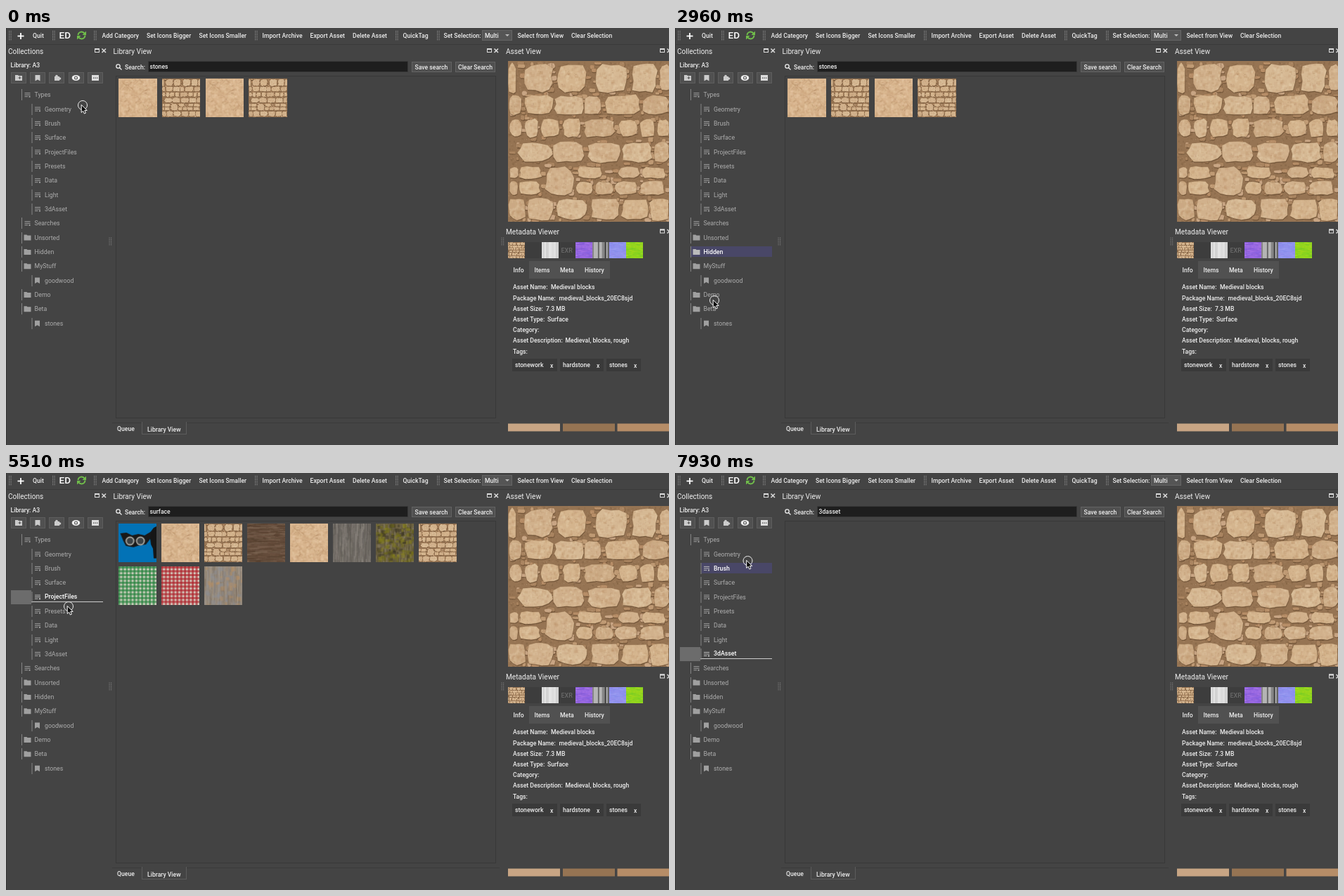
Write an HTML page with a canvas that moves like this. It is 943 px wide and 594 px high and loops after 8000 ms.

```html
<!DOCTYPE html>
<html lang="en">
<head>
<meta charset="utf-8">
<title>Asset library</title>
<style>
  html, body { margin: 0; width: 100%; height: 100%; overflow: hidden; background: #444; }
  canvas { display: block; }
</style>
</head>
<body>
<canvas id="stage" width="943" height="594"></canvas>
<script>
const WIDTH = 943, HEIGHT = 594, LOOP = 8000;
const stage = document.getElementById('stage').getContext('2d');

let seed = 1;
function random() {
  seed = (seed * 16807) % 2147483647;
  return seed / 2147483647;
}
const between = (a, b) => a + (b - a) * random();
const pick = list => list[Math.floor(random() * list.length)];

function layer(w, h, paint) {
  const canvas = document.createElement('canvas');
  canvas.width = w;
  canvas.height = h;
  seed = 4711;
  paint(canvas.getContext('2d'), w, h);
  return canvas;
}

// ---------- basic drawing helpers ----------
function rect(g, x, y, w, h, color) {
  g.fillStyle = color;
  g.fillRect(x, y, w, h);
}
function box(g, x, y, w, h, fill, border) {
  rect(g, x, y, w, h, border);
  rect(g, x + 1, y + 1, w - 2, h - 2, fill);
}
function text(g, str, x, y, color = '#eee', size = 8.65, weight = 500) {
  g.font = `${weight} ${size}px Roboto, sans-serif`;
  g.fillStyle = color;
  g.fillText(str, x, y + size * 0.355);
}
function shape(g, points, color) {
  g.fillStyle = color;
  g.beginPath();
  points.forEach(([x, y]) => g.lineTo(x, y));
  g.closePath();
  g.fill();
}
function disc(g, x, y, r, color) {
  g.fillStyle = color;
  g.beginPath();
  g.arc(x, y, r, 0, 7);
  g.fill();
}
function ring(g, x, y, r, color, width, from = 0, to = Math.PI * 2) {
  g.strokeStyle = color;
  g.lineWidth = width;
  g.beginPath();
  g.arc(x, y, r, from, to);
  g.stroke();
}

// ---------- textures ----------
function speckle(g, w, h, count, colors, size, alpha) {
  g.globalAlpha = alpha;
  for (let i = 0; i < count; i++)
    rect(g, random() * w, random() * h, between(0.4, 1) * size, between(0.4, 1) * size, pick(colors));
  g.globalAlpha = 1;
}
function roughStone(cx, cy, rx, ry) {
  const path = new Path2D(), power = between(3, 7), corners = 13, turn = random();
  for (let i = 0; i < corners; i++) {
    const a = (i + turn) / corners * Math.PI * 2, c = Math.cos(a), s = Math.sin(a);
    const r = (Math.abs(c) ** power + Math.abs(s) ** power) ** (-1 / power) * between(0.86, 1.05);
    path.lineTo(cx + c * r * rx, cy + s * r * ry);
  }
  path.closePath();
  return path;
}
function paintStone(g, x, y, w, h, color) {
  const path = roughStone(x + w / 2, y + h / 2, w / 2, h / 2);
  g.lineJoin = 'round';
  g.save();
  g.translate(0.4, 1.2);
  g.fillStyle = 'rgba(82,58,36,.5)';
  g.fill(path);
  g.restore();
  g.fillStyle = color;
  g.fill(path);
  g.save();
  g.clip(path);
  g.translate(x, y);
  speckle(g, w, h, w * h / 12, ['#e6cfae', '#dbbf9a', '#b68d67', '#c8a584'], Math.min(5, h / 4), 0.24);
  g.restore();
  g.strokeStyle = 'rgba(120,88,56,.3)';
  g.lineWidth = 0.7;
  g.stroke(path);
}

// Each course: top, height, then left and width of every block.
const COURSES = [
  [3, 43, 0, 12, 22, 42, 70, 42, 124, 46, 176, 36, 216, 14],
  [47, 31, 1, 19, 23, 42, 66, 41, 108, 24, 139, 50, 191, 38],
  [82, 27, 2, 18, 24, 19, 46, 28, 78, 26, 108, 44, 158, 26, 188, 20, 212, 17],
  [114, 32, 14, 49, 65, 44, 113, 47, 162, 44, 208, 21],
  [150, 18, 2, 13, 16, 32, 98, 36, 156, 32, 190, 34],
  [150, 43, 52, 42],
  [171, 20, 2, 12, 16, 30, 97, 24, 124, 26, 152, 32, 188, 34],
  [194, 34, 1, 24, 28, 36, 67, 47, 118, 41, 161, 38, 201, 28]
];
const stoneWall = layer(229, 229, (g, w, h) => {
  rect(g, 0, 0, w, h, '#967453');
  speckle(g, w, h, 2200, ['#7c5d3f', '#ab8661', '#876646'], 3, 0.4);
  for (let i = 0; i < 330; i++)
    paintStone(g, random() * w, random() * h, between(4, 13), between(3, 8), pick(['#b68d67', '#bf9a74', '#a98460', '#c8a584']));
  for (const [top, height, ...blocks] of COURSES)
    for (let i = 0; i < blocks.length; i += 2) {
      const tall = height * between(0.86, 1.02);
      paintStone(g, blocks[i], top + (height - tall) / 2, blocks[i + 1], tall, pick(['#d1b18c', '#d6b994', '#cbaa84', '#d4b48d']));
    }
  speckle(g, w, h, 900, ['#ecdabd', '#7a5b3d'], 1.4, 0.22);
});

const tile = paint => layer(55, 55, paint);
const sand = tile((g, w, h) => {
  rect(g, 0, 0, w, h, '#d8b48d');
  speckle(g, w, h, 700, ['#e6cba8', '#c39c74', '#dfbf99'], 4, 0.3);
  g.strokeStyle = 'rgba(160,120,82,.38)';
  g.lineWidth = 0.7;
  for (let i = 0; i < 26; i++) {
    let x = random() * w, y = random() * h;
    g.beginPath();
    g.moveTo(x, y);
    for (let k = 0; k < 4; k++) g.lineTo(x += between(-5, 5), y += between(-4, 5));
    g.stroke();
  }
});
function streaks(base, colors, vertical, length = 30, size = 55, count = 420) {
  return layer(size, size, (g, w, h) => {
    rect(g, 0, 0, w, h, base);
    g.globalAlpha = 0.42;
    for (let i = 0; i < count; i++) {
      const l = between(3, length), x = between(-length / 2, w), y = between(-2, h), t = between(0.5, 1.4);
      if (vertical) rect(g, y, x, t, l, pick(colors));
      else rect(g, x, y, l, t, pick(colors));
    }
    g.globalAlpha = 1;
  });
}
const bars = colors => layer(24, 24, (g, w, h) => {
  for (let x = 0; x < w; x += 2) rect(g, x, 0, 2, h, pick(colors));
});
const gingham = color => tile((g, w, h) => {
  rect(g, 0, 0, w, h, '#d6d2c4');
  g.globalAlpha = 0.64;
  for (let p = 0; p < w; p += 5.5) {
    rect(g, p, 0, 3, h, color);
    rect(g, 0, p, w, 3, color);
  }
  g.globalAlpha = 1;
});
const mask = tile((g, w, h) => {
  rect(g, 0, 0, w, h, '#0272b6');
  shape(g, [[45, 14], [51, 6], [55, 4], [55, 50], [51, 50], [50, 36], [47, 30]], '#161616');
  shape(g, [[3, 14], [12, 13], [20, 17], [29, 15], [38, 17], [48, 11], [46, 22], [40, 30], [28, 32], [22, 34], [11, 32], [7, 24]], '#191919');
  for (const x of [17, 32]) {
    disc(g, x, 25, 6.5, '#a5a59f');
    disc(g, x, 25, 4.6, '#3c4245');
  }
});
const brownWood = streaks('#6b5140', ['#4b3828', '#86705e', '#5c4636'], false);
const greyWood = streaks('#78736d', ['#54504b', '#98928a', '#69645d'], true, 45);
const mossyBark = layer(55, 55, (g, w, h) => {
  g.drawImage(streaks('#6c6140', ['#423c28', '#989082', '#77704f'], true, 13), 0, 0);
  speckle(g, w, h, 150, ['#87821f', '#6f6a18', '#3b3522'], 6, 0.5);
});
const wornWood = layer(55, 55, (g, w, h) => {
  g.drawImage(streaks('#998b7b', ['#a99d8c', '#8a8b90', '#7f7060'], true, 40), 0, 0);
  speckle(g, w, h, 60, ['#b98f60', '#8c9097'], 7, 0.4);
});

const RESULTS = {
  stones: [sand, stoneWall, sand, stoneWall],
  surface: [mask, sand, stoneWall, brownWood, sand, greyWood, mossyBark, stoneWall,
            gingham('#21803a'), gingham('#ad1d27'), wornWood]
};

// ---------- icons ----------
function grip(g, x, y, rows, color = '#8d8d8d') {
  for (let i = 0; i < rows; i++)
    for (const dx of [0, 2.5]) rect(g, x + dx, y + i * 2.4, 1.2, 1.2, color);
}
function listIcon(g, x, y, color) {
  rect(g, x, y - 3, 8, 1, color);
  rect(g, x, y - 0.5, 8, 1, color);
  rect(g, x, y + 2, 4.5, 1, color);
  rect(g, x + 6, y + 1.6, 2, 2, color);
}
function folderIcon(g, x, y, color) {
  shape(g, [[x, y - 4], [x + 4, y - 4], [x + 5, y - 3], [x + 10, y - 3], [x + 10, y + 4], [x, y + 4]], color);
}
function bookmarkIcon(g, x, y, color) {
  shape(g, [[x, y - 4], [x + 7, y - 4], [x + 7, y + 4.5], [x + 3.5, y + 2.5], [x, y + 4.5]], color);
}
function refreshIcon(g, x, y) {
  const green = '#70bd4b';
  ring(g, x, y, 5, green, 2, Math.PI * 1.02, Math.PI * 1.8);
  ring(g, x, y, 5, green, 2, 0.02, Math.PI * 0.8);
  shape(g, [[x + 6.5, y - 6], [x + 6.5, y - 0.5], [x + 1, y - 0.5]], green);
  shape(g, [[x - 6.5, y + 6], [x - 6.5, y + 0.5], [x - 1, y + 0.5]], green);
}
function panelTitle(g, title, x, y, iconX) {
  text(g, title, x, y, '#eee', 10.1, 400);
  g.strokeStyle = '#ddd';
  g.lineWidth = 1;
  g.strokeRect(iconX + 0.5, y - 3.5, 6, 5);
  rect(g, iconX, y - 4, 7, 2, '#ddd');
  g.lineWidth = 1.5;
  g.beginPath();
  g.moveTo(iconX + 10.5, y - 3.5); g.lineTo(iconX + 16, y + 2);
  g.moveTo(iconX + 16, y - 3.5); g.lineTo(iconX + 10.5, y + 2);
  g.stroke();
}

// ---------- fixed parts of the window ----------
function paintToolbar(g) {
  for (const x of [4, 66, 125, 354, 554, 613]) grip(g, x, 4, 6);
  rect(g, 16.5, 10.6, 9, 1.8, '#fff');
  rect(g, 20.1, 7, 1.8, 9, '#fff');
  text(g, 'ED', 75.5, 10.5, '#fff', 13.5);
  refreshIcon(g, 107.5, 10.5);
  box(g, 677, 3, 43, 15, '#555', '#656565');
  shape(g, [[710, 9], [716, 9], [713, 12]], '#bbb');
  const items = { 'Quit': 38, 'Add Category': 136.5, 'Set Icons Bigger': 200, 'Set Icons Smaller': 274.5,
    'Import Archive': 364.5, 'Export Asset': 432.5, 'Delete Asset': 493, 'QuickTag': 564.5,
    'Set Selection:': 622.5, 'Multi': 681, 'Select from View': 727.5, 'Clear Selection': 804 };
  for (const name in items) text(g, name, items[name], 10.5);
  rect(g, 0, 23, WIDTH, 1, '#3a3a3a');
}
function paintCollectionsHead(g) {
  panelTitle(g, 'Collections', 3, 33, 126);
  text(g, 'Library: A3', 6.5, 52.5);
  for (let i = 0; i < 5; i++) box(g, 7 + Math.round(i * 27.2), 63, 22, 16, '#505050', '#5e5e5e');
  const light = '#ccc';
  folderIcon(g, 13, 71, light);
  rect(g, 17.5, 70.5, 4, 1, '#555');
  rect(g, 19, 69, 1, 4, '#555');
  bookmarkIcon(g, 41.5, 71, light);
  rect(g, 69, 69, 7, 6, light);
  disc(g, 72, 68.5, 1.8, light);
  disc(g, 76.5, 72, 1.8, light);
  g.fillStyle = '#eee';
  g.beginPath();
  g.ellipse(99.5, 71, 5.8, 4, 0, 0, 7);
  g.fill();
  disc(g, 99.5, 71, 2.5, '#505050');
  disc(g, 99.5, 71, 1.4, '#eee');
  rect(g, 122, 67, 10, 8, '#ddd');
  for (const x of [124, 126.5, 129]) rect(g, x, 70.5, 1.3, 1.3, '#444');
}
function paintLibrary(g) {
  panelTitle(g, 'Library View', 152.5, 33, 684);
  ring(g, 159.5, 54.5, 2.7, '#eee', 1.3);
  g.beginPath();
  g.moveTo(161.5, 56.5);
  g.lineTo(164.5, 59.5);
  g.stroke();
  text(g, 'Search:', 169, 55.5);
  box(g, 202, 47, 370, 16, '#1e1e1e', '#383838');
  box(g, 577, 48, 57, 15, '#505050', '#636363');
  box(g, 639, 48, 57, 15, '#505050', '#636363');
  text(g, 'Save search', 581.5, 55.5);
  text(g, 'Clear Search', 643, 55.5);
  box(g, 156, 68, 541, 488, '#434343', '#383838');
  rect(g, 151, 562, 551, 1, '#3b3b3b');
  box(g, 193, 561, 64, 18, '#444', '#5c5c5c');
  rect(g, 194, 561, 62, 1, '#444');
  text(g, 'Queue', 158, 571);
  text(g, 'Library View', 201, 571.5);
  grip(g, 146.5, 298.5, 5, '#7c7c7c');
  grip(g, 704.5, 298.5, 5, '#7c7c7c');
}
function paintDetails(g) {
  panelTitle(g, 'Asset View', 711, 33, 930);
  g.drawImage(stoneWall, 714, 47);
  panelTitle(g, 'Metadata Viewer', 711, 290.5, 930);

  const maps = [
    stoneWall, null,
    bars(['#dcdcdc', '#e4e4e4', '#d2d2d2']), null,
    streaks('#9a68df', ['#7452d0', '#bd83ee', '#8160e8'], false, 10, 24, 160),
    bars(['#858585', '#3c3c3c', '#b4b4b4', '#666']),
    streaks('#9092ee', ['#a8aaf5', '#7d86e6', '#a38cec'], false, 10, 24, 130),
    streaks('#94d41e', ['#5fc42e', '#c4e01a', '#7ddb20'], false, 10, 24, 150)
  ];
  maps.forEach((map, i) => {
    if (map) g.drawImage(map, 714 + i * 24, 305, 23.5, 23);
    else rect(g, 714 + i * 24, 305, 24, 23, '#3d3d3d');
  });
  text(g, 'EXR', 789.5, 317, '#6a6a6a', 9);

  rect(g, 744, 332, 115, 25, '#515151');
  const tabs = { Info: 721.5, Items: 751.5, Meta: 788, History: 823 };
  for (const name in tabs) text(g, name, tabs[name], 345);

  const fields = [['Asset Name:', 'Medieval blocks', 775], ['Package Name:', 'medieval_blocks_20EC8sjd', 786.5],
    ['Asset Size:', '7.3 MB', 768], ['Asset Type:', 'Surface', 770], ['Category:', '', 0],
    ['Asset Description:', 'Medieval, blocks, rough', 795.5], ['Tags:', '', 0]];
  fields.forEach(([label, value, x], i) => {
    const y = 369.3 + i * 15.2;
    text(g, label, 721, y);
    text(g, value, x, y);
  });
  for (const [tag, x, w] of [['stonework', 720, 64], ['hardstone', 788, 62], ['stones', 854, 49]]) {
    rect(g, x, 471, w, 18, '#3a3a3a');
    text(g, tag, x + 4, 480);
    text(g, 'x', x + w - 10, 480.5);
  }
  rect(g, 714, 563.5, 74, 11, '#c8a584');
  rect(g, 792, 563.5, 74, 11, '#967453');
  rect(g, 869.5, 563.5, 74, 11, '#b68d67');
}
const windowLayer = layer(WIDTH, HEIGHT, g => {
  rect(g, 0, 0, WIDTH, HEIGHT, '#444');
  rect(g, 0, 0, 1, HEIGHT, '#363636');
  paintToolbar(g);
  paintCollectionsHead(g);
  paintLibrary(g);
  paintDetails(g);
});

// ---------- moving parts ----------
const TREE = [
  ['Types', 0, listIcon],
  ...['Geometry', 'Brush', 'Surface', 'ProjectFiles', 'Presets', 'Data', 'Light', '3dAsset'].map(n => [n, 1, listIcon]),
  ['Searches', 0, listIcon], ['Unsorted', 0, folderIcon], ['Hidden', 0, folderIcon], ['MyStuff', 0, folderIcon],
  ['goodwood', 1, bookmarkIcon], ['Demo', 0, folderIcon], ['Beta', 0, folderIcon], ['stones', 1, bookmarkIcon]
];
function drawTree(g, hover, selected) {
  TREE.forEach(([name, depth, icon], i) => {
    const y = 95.2 + i * 20.34, x = 22 + depth * 14.5;
    const active = name === selected, lit = active || name === hover;
    if (active) {
      rect(g, 7, Math.round(y - 10), 29, 20, '#6c6c6c');
      rect(g, 36, Math.round(y + 6.3), 102, 1, '#ccc');
    } else if (lit) {
      rect(g, x + 1, Math.round(y - 7.5), 137 - x, 15, '#494767');
    }
    rect(g, x, Math.round(y - 8), 1, 16, '#858585');
    icon(g, x + (icon === folderIcon ? 3.5 : 4.5), y, lit ? '#bbb' : '#a0a0a0');
    text(g, name, x + 18.5, active ? y - 0.8 : y, lit ? '#fff' : '#adadad', 8.75, lit ? 500 : 400);
  });
}
function drawResults(g, query) {
  const tiles = RESULTS[query] || [];
  const [left, step] = query === 'stones' ? [160.3, 61.6] : [159.5, 61];
  tiles.forEach((image, i) =>
    g.drawImage(image, left + (i % 8) * step, 72 + Math.floor(i / 8) * 61, 54.5, 54.5));
}
function drawPointer(g, x, y) {
  ring(g, x, y, 6.5, '#eee', 1);
  const arrow = [[0, 0], [0, 11], [2.5, 8.8], [4.2, 12.6], [6.2, 11.7], [4.6, 8], [8, 8]];
  shape(g, arrow.map(([dx, dy]) => [x - 1.8 + dx, y - 0.6 + dy]), '#0a0a0a');
  g.strokeStyle = '#fff';
  g.lineWidth = 1;
  g.stroke();
}

// time, pointer x, pointer y, hovered row, selected row, search text
const STEPS = [
  [0, 109, 110, '', '', 'stones'],
  [180, 111, 134, 'Brush', '', 'stones'],
  [420, 112, 157, 'Surface', '', 'stones'],
  [780, 113, 185, 'ProjectFiles', '', 'stones'],
  [960, 115, 238, 'Light', '', 'stones'],
  [1140, 121, 292, 'Unsorted', '', 'stones'],
  [1350, 140.5, 277, '', '', 'stones'],
  [1520, 185, 284, '', '', 'stones'],
  [1730, 211, 270, '', '', 'stones'],
  [1910, 168, 185, '', '', 'stones'],
  [2080, 118, 90, 'Types', '', 'stones'],
  [2260, 100, 135, 'Brush', '', 'stones'],
  [2430, 88, 196, 'Presets', '', 'stones'],
  [2610, 74, 274, 'Searches', '', 'stones'],
  [2780, 62, 313, 'Hidden', '', 'stones'],
  [2960, 56, 388, 'Hidden', '', 'stones'],
  [3140, 56, 431, 'stones', '', 'stones'],
  [3310, 62, 396, 'Beta', '', 'stones'],
  [3490, 71, 298, 'Unsorted', '', 'stones'],
  [3670, 79, 192, 'Presets', '', 'stones'],
  [3850, 85, 117, 'Geometry', '', 'stones'],
  [4200, 85, 117, 'Geometry', 'Geometry', 'stones'],
  [4380, 86, 121, 'Geometry', 'Geometry', 'geometry'],
  [4560, 87, 137, 'Brush', 'Brush', 'geometry'],
  [4740, 87, 142, 'Brush', 'Brush', 'brush'],
  [4970, 88, 157, 'Surface', 'Surface', 'brush'],
  [5150, 88, 160, 'Surface', 'Surface', 'surface'],
  [5330, 89, 177, 'ProjectFiles', 'Surface', 'surface'],
  [5510, 89, 190, '', 'ProjectFiles', 'surface'],
  [5680, 87, 196, 'Presets', 'ProjectFiles', 'projectfiles'],
  [5860, 84, 199, '', 'Presets', 'projectfiles'],
  [6040, 81, 212, 'Data', 'Presets', 'presets'],
  [6210, 78, 218, '', 'Data', 'presets'],
  [6390, 76, 222, '', 'Data', 'data'],
  [6560, 75, 236, 'Light', 'Data', 'data'],
  [6710, 76, 238, '', 'Light', 'data'],
  [6890, 77, 252, '3dAsset', 'Light', 'light'],
  [7070, 79, 258, '', '3dAsset', 'light'],
  [7240, 80, 258, '', '3dAsset', '3dasset'],
  [7420, 84, 256, '', '3dAsset', '3dasset'],
  [7570, 93, 215, 'Data', '3dAsset', '3dasset'],
  [7750, 99, 166, 'Surface', '3dAsset', '3dasset'],
  [7930, 103.5, 125, 'Brush', '3dAsset', '3dasset']
];

function draw(time) {
  const [, x, y, hover, selected, query] = STEPS.findLast(step => step[0] <= time);
  stage.drawImage(windowLayer, 0, 0);
  drawTree(stage, hover, selected);
  text(stage, query, 204.5, 55.2);
  drawResults(stage, query);
  drawPointer(stage, x, y);
}

const start = performance.now();
function tick() {
  draw((performance.now() - start) % LOOP);
  requestAnimationFrame(tick);
}
tick();
</script>
</body>
</html>
```
